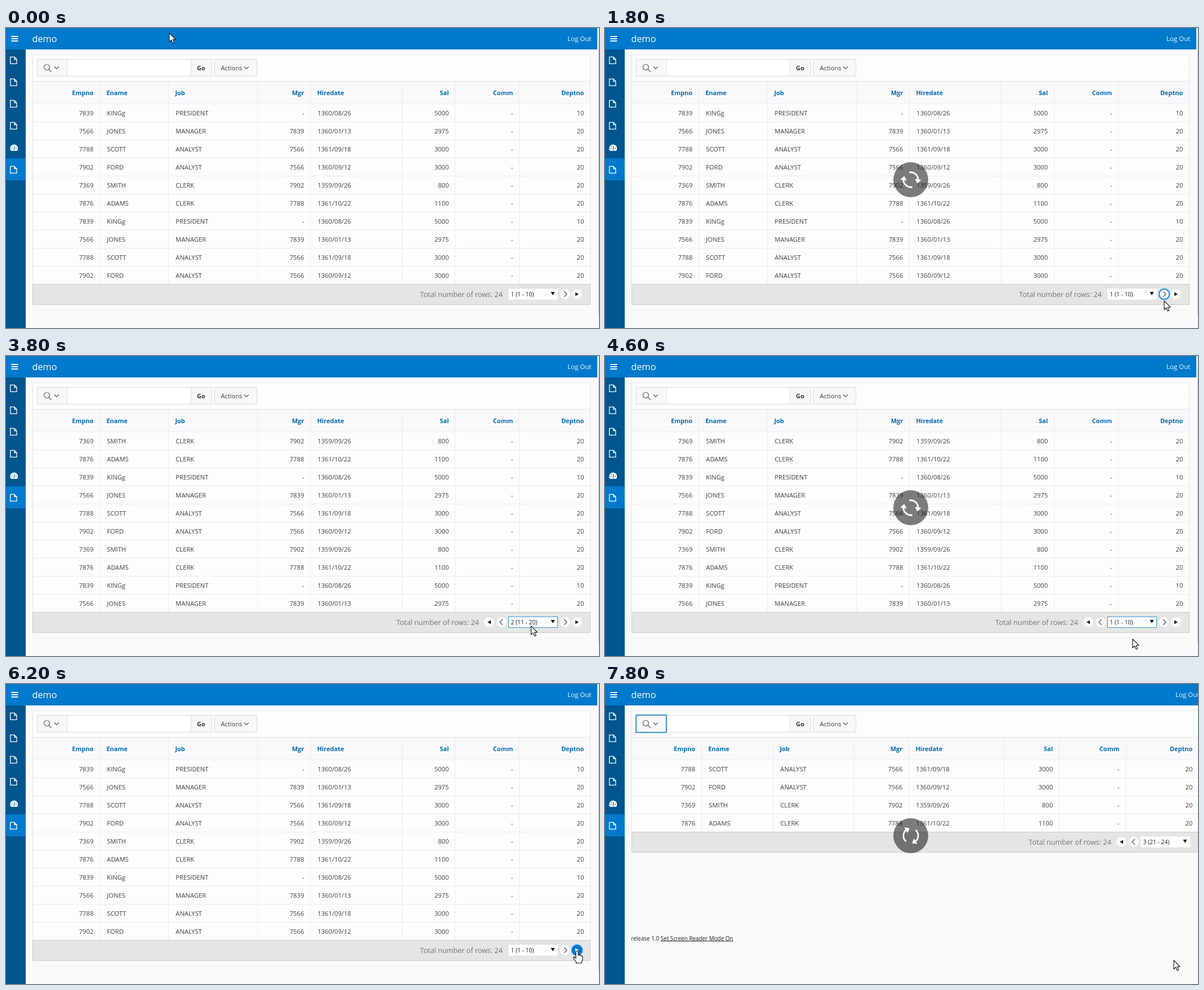
An HTML page for the animation above (8 s loop, 1053 by 532 pixels).

```html
<!DOCTYPE html>
<html lang="en">
<head>
<meta charset="utf-8">
<title>Report paging</title>
<style>
  html, body { margin: 0; width: 100%; height: 100%; overflow: hidden; background: #fafafd; }
  svg { display: block; width: 1053px; height: 532px; font: 11.2px "Open Sans", "Noto Sans", sans-serif; }
</style>
</head>
<body>
<svg id="stage" viewBox="0 0 1053 532"></svg>
<script>
const LOOP = 8000, STEP = 200, BLUE = '#007acc', INK = '#404040';
const stage = document.getElementById('stage');

const people = [
  ['7839', 'KINGg', 'PRESIDENT', '-', '1360/08/26', '5000', '-', '10'],
  ['7566', 'JONES', 'MANAGER', '7839', '1360/01/13', '2975', '-', '20'],
  ['7788', 'SCOTT', 'ANALYST', '7566', '1361/09/18', '3000', '-', '20'],
  ['7902', 'FORD', 'ANALYST', '7566', '1360/09/12', '3000', '-', '20'],
  ['7369', 'SMITH', 'CLERK', '7902', '1359/09/26', '800', '-', '20'],
  ['7876', 'ADAMS', 'CLERK', '7788', '1361/10/22', '1100', '-', '20'],
];
const heads = ['Empno', 'Ename', 'Job', 'Mgr', 'Hiredate', 'Sal', 'Comm', 'Deptno'];
const leftAligned = [1, 2, 4];
const edges = [47, 167, 289, 447, 541, 704, 798, 912, 1038];
const wideEdges = [47, 172, 299, 442, 540, 709, 807, 925, 1055];
const ranges = ['1 (1 - 10)', '2 (11 - 20)', '3 (21 - 24)'];

// time, x, y of the pointer tip
const pointerPath = [
  [0, 290, 9], [1200, 993, 477], [1800, 993, 484], [3000, 991, 491], [3600, 935, 474],
  [4200, 925, 492], [4600, 937, 502], [5400, 975, 499], [6200, 1014, 473], [7400, 1014, 473],
  [7800, 1010, 490], [8000, 1010, 490],
];

const rect = (x, y, w, h, fill, extra = '') =>
  `<rect x="${x}" y="${y}" width="${w}" height="${h}" fill="${fill}" ${extra}/>`;
const box = (x, y, w, h, fill, stroke) =>
  rect(x + .5, y + .5, w - 1, h - 1, fill, `stroke="${stroke}"`);
const path = (d, stroke, fill = 'none', width = 1.2, extra = '') =>
  `<path d="${d}" fill="${fill}" stroke="${stroke}" stroke-width="${width}" ${extra}/>`;
const text = (x, y, s, fill = INK, extra = '') =>
  `<text x="${x}" y="${y}" fill="${fill}" ${extra}>${s}</text>`;
const group = (x, y, body, turn = 0) =>
  `<g transform="translate(${x} ${y}) rotate(${turn})">${body}</g>`;
const END = 'text-anchor="end"', BOLD = 'font-weight="bold" font-size="11"';

function chrome(wide) {
  let s = rect(0, 0, wide ? 1053 : 1050, 38, BLUE) + rect(0, 38, 35, 494, '#01568f') + rect(0, 231, 35, 39, BLUE);
  for (const y of [14, 18, 22]) s += rect(9.5, y, 12, 2, '#fff');
  for (const y of [57, 96, 134, 173, 251])
    s += group(7, y - 6.5, path('M.8 .8H8L12 5V12.8H.8ZM8 .8V5H12', '#fff', 'none', 1.3));
  s += path('M8.800 217.800A7 7 0 1 1 19.800 217.800Z', 'none', '#fff')
    + path('M14.3 216L15.4 210M9.500 213.5h1.6M17.5 213.5h1.6M11.2 209.5l1 1', '#01568f');
  s += text(46.5, 25, 'demo', '#fff', 'font-size="16.3"')
    + text(wide ? 1013 : 997, 23, 'Log Out', '#fff', 'font-size="11.5"');
  if (!wide) s += rect(1050, 0, 3, 532, '#f8f8f9') + rect(1052, 15, 1, 493, '#c4c4c4');
  return s;
}

function toolbar(focused) {
  const chevron = (x, y) => path(`M${x} ${y}l4 4l4 -4`, '#555');
  return box(55, 55, 54, 31, '#f8f8f8', '#dcdcdc') + box(108, 55, 221, 31, '#fff', '#dcdcdc')
    + box(328, 55, 38, 31, '#f8f8f8', '#dcdcdc') + box(370, 55, 76, 31, '#f8f8f8', '#dcdcdc')
    + (focused ? rect(54.5, 54.5, 55, 32, 'none', 'stroke="#9ccbee" stroke-width="2"')
      + box(55, 55, 54, 31, '#f8f8f8', '#0069b0') : '')
    + '<circle cx="72.5" cy="69.5" r="5" fill="none" stroke="#666" stroke-width="1.2"/>'
    + path('M76 73.2L81 78', '#666') + chevron(86, 68.5) + chevron(423, 68.5)
    + text(339, 75, 'Go', '#333', BOLD) + text(381.5, 75, 'Actions');
}

function table(page, wide) {
  const cols = wide ? wideEdges : edges;
  const count = page == 2 ? 4 : 10, right = cols[8], bottom = 135 + 32 * count;
  let s = box(47, 47, right - 47, bottom - 47, '#fdfdfc', '#e6e6e6')
    + rect(48, 95, right - 49, 40, '#f9f9fc') + rect(47, 94, right - 47, 1, '#e4e4e4');
  const cell = (i, y, label, inset, fill, extra = '') => leftAligned.includes(i)
    ? text(cols[i] + inset, y, label, fill, extra)
    : text(cols[i + 1] - 11.7, y, label, fill, extra + ' ' + END);
  heads.forEach((h, i) => s += cell(i, 119, h, 11.4, '#006bb0', BOLD));
  for (const x of cols.slice(1, 8)) s += rect(x - 1, 95, 1, bottom - 95, '#ececee');
  for (let r = 0; r < count; r++) {
    const y = 135 + 32 * r;
    s += rect(48, y - 1, right - 49, 1, '#ececec');
    people[(page * 10 + r) % 6].forEach((v, i) => s += cell(i, y + 20, v, 12.3, INK));
  }
  return s + box(47, bottom - 1, right - 47, 37, '#e5e5e3', '#cbcbcb');
}

function pager(page, shown, focus) {
  const button = (x, d, solid, name) => {
    const hot = focus == name, lit = hot && solid;
    return (hot ? `<circle cx="${x}" cy="472" r="10" fill="none" stroke="#a5d1f2" stroke-width="2"/>` : '')
      + `<circle cx="${x}" cy="472" r="9" fill="${lit ? BLUE : '#fafafa'}" stroke="${hot ? BLUE : '#f2f2f2'}" stroke-width="${hot ? 1.5 : .5}"/>`
      + group(x, 472, solid ? path(d, 'none', lit ? '#fff' : '#222') : path(d, '#555'));
  };
  let s = text(page ? 840 : 882, 476.5, 'Total number of rows: 24', '#757575', END + ' font-size="12.65"')
    + box(892, 462, 88, 20, '#fff', focus == 'select' ? '#3a9be0' : '#f4f4f4')
    + text(896.5, 476, ranges[shown], '#222', 'font-size="10.3"')
    + path('M967.5 468h7l-3.5 6z', 'none', '#111');
  if (page) s += button(858, 'M3 -3.5V3.5L-3 0Z', true, 'first') + button(880, 'M2 -5L-3 0L2 5', false, 'prev');
  if (page < 2) s += button(993, 'M-2 -5L3 0L-2 5', false, 'next') + button(1014, 'M-3 -3.5V3.5L3 0Z', true, 'last');
  return page == 2 ? group(59, -192, s) : s;
}

function spinner(t) {
  const half = path('M-4.5 -12.5A13.3 13.3 0 0 1 13 -1', '#fff', 'none', 2.8) + path('M7 -2.5H18.500L12.5 5Z', 'none', '#fff');
  return '<circle cx="543" cy="269" r="31" fill="#000" fill-opacity=".51"/>'
    + group(543, 269, half + group(0, 0, half, 180), 8 + (t - 1800) * 360 / 2800);
}

function pointer(t) {
  const i = pointerPath.findIndex(p => p[0] > t);
  const [t0, x0, y0] = pointerPath[i - 1], [t1, x1, y1] = pointerPath[i];
  const u = (t - t0) / (t1 - t0), k = u * u * (3 - 2 * u);
  const hand = t >= 6200 && t < 7600;
  const shape = hand
    ? 'M-2 1.5Q0 -1 2 1.5V8Q4 6.5 5 8.5Q7 7.5 8 9.5Q10 9 10 11.5V15Q9.5 18 8 19.5V22H-1.5V20Q-5 16 -6.5 12.5Q-6 10 -3.5 12L-2 13.5Z'
    : 'M0 0V15.5L3.6 12.2L6.2 18L8.8 16.8L6.2 11.2H11Z';
  return group(x0 + (x1 - x0) * k, y0 + (y1 - y0) * k, path(shape, '#111', '#fff', 1.1, 'stroke-linejoin="round"'));
}

function scene(t) {
  const between = (a, b) => t >= a && t < b;
  const page = t >= 7600 ? 2 : between(2200, 5000) ? 1 : 0;
  const shown = between(4200, 5000) ? 0 : page;
  const focus = between(1400, 2200) ? 'next' : between(3600, 5000) ? 'select' : between(6200, 7600) ? 'last' : '';
  const wide = page == 2;
  const loading = between(1400, 2400) || between(4200, 5200) || t >= 7000;
  const searchFocused = between(2200, 3600) || between(5000, 6200) || wide;
  return rect(0, 0, 1053, 532, '#fafafd') + chrome(wide) + table(page, wide) + toolbar(searchFocused)
    + pager(page, shown, focus)
    + (wide ? text(46.5, 454.5, 'release 1.0 <tspan text-decoration="underline">Set Screen Reader Mode On</tspan>', '#222', 'font-size="9.9"') : '')
    + (loading ? spinner(t) : '') + pointer(t);
}

let drawn = -1;
function tick() {
  const t = Math.floor(performance.now() % LOOP / STEP) * STEP;
  if (t != drawn) stage.innerHTML = scene(drawn = t);
  requestAnimationFrame(tick);
}
tick();
</script>
</body>
</html>
```
